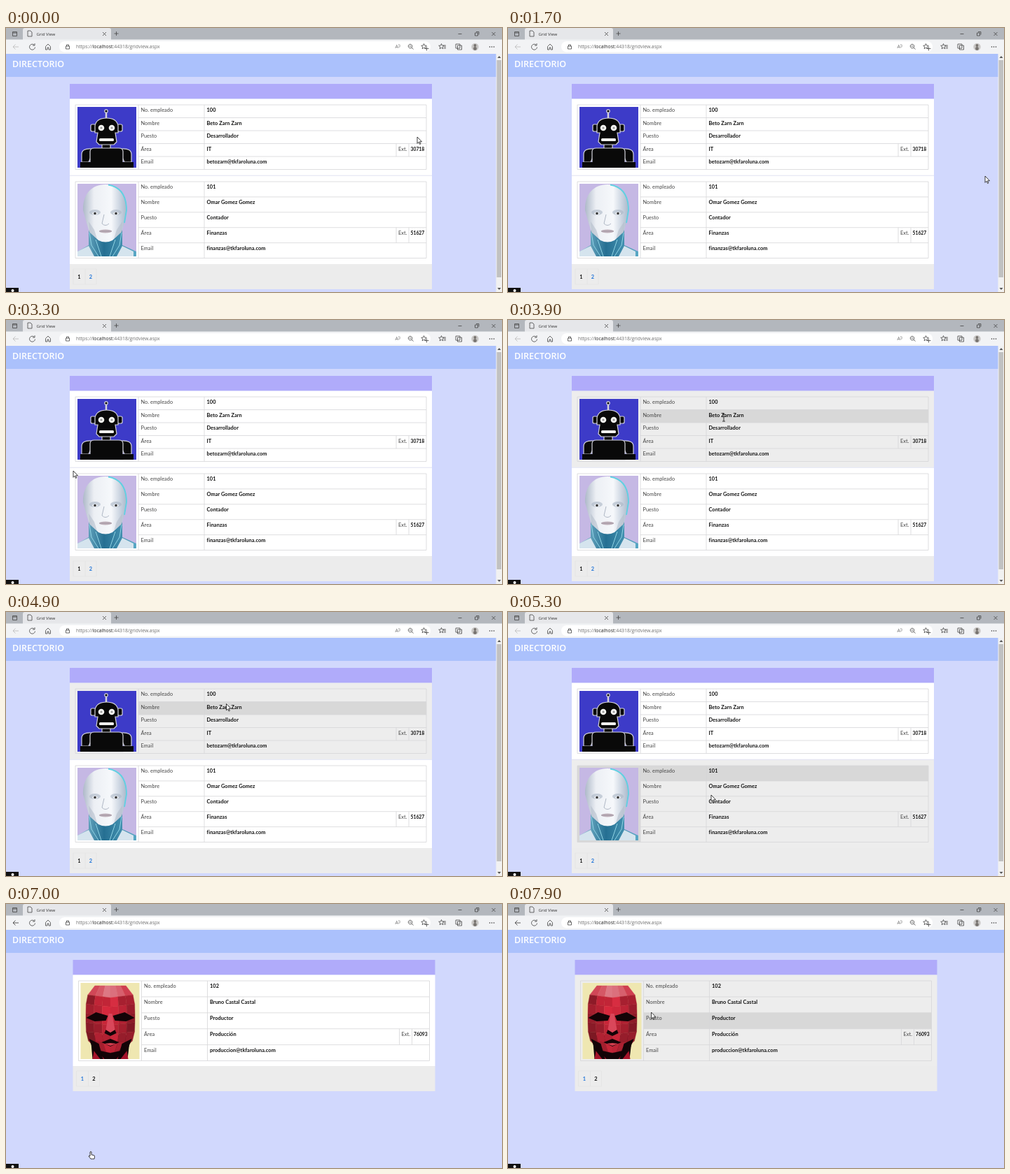
Write an HTML page that moves like this. It is 708 px wide and 378 px high and loops after 8000 ms.

```html
<!DOCTYPE html>
<html lang="es">
<head>
<meta charset="utf-8">
<title>Grid View</title>
<style>
html, body { margin: 0; width: 100%; height: 100%; overflow: hidden; }
svg { display: block; width: 100vw; height: 100vh; }
text { font: 6.9px "Open Sans", sans-serif; fill: #707070; }
.title { font-size: 12.5px; font-weight: 600; fill: #fff; }
.label { font: 7.3px Lato, sans-serif; letter-spacing: .1px; fill: #444; }
.value { font: 700 7.4px Lato, sans-serif; letter-spacing: .05px; fill: #111; }
.ext { font-size: 6.8px; letter-spacing: 0; }
.page { font: 700 7.4px Lato, sans-serif; fill: #111; text-anchor: middle; }
.link { fill: #1f74d8; }
.icon { fill: none; stroke: #444; stroke-width: .8; }
.grid { fill: none; stroke: #d6d6d8; stroke-width: .8; }
</style>
</head>
<body>
<svg id="stage" viewBox="0 0 708 378">
  <defs>
    <linearGradient id="skin">
      <stop offset="0" stop-color="#aeb9c9"/><stop offset=".25" stop-color="#eceff4"/>
      <stop offset=".65" stop-color="#f6f8fb"/><stop offset="1" stop-color="#a9b8cb"/>
    </linearGradient>
    <linearGradient id="neck">
      <stop offset="0" stop-color="#8cc4d8"/><stop offset=".45" stop-color="#256f92"/>
      <stop offset="1" stop-color="#5aa9c6"/>
    </linearGradient>
  </defs>
  <g id="chrome"></g>
  <g id="page1"></g>
  <g id="page2"></g>
  <rect y="372" width="18" height="6" fill="#111"/>
  <circle cx="9.5" cy="376" r="2" fill="#fff"/>
  <g id="cursor" fill="#fff" stroke="#111" stroke-width=".8" stroke-linejoin="round">
    <path d="M0 0V9.3L2 7.3 3.6 10.5 4.9 9.9 3.5 6.8H6.5Z"/>
    <path d="M-2-5h4M0-5V5M-2 5h4"/>
    <path d="M-1 0q1-1 2 0V4l4 1q1 1 0 5H0L-3 6q1-1 2 0z"/>
  </g>
</svg>
<script>
const $ = id => document.getElementById(id);
const rect = (x, y, w, h, fill, extra = '') =>
  `<rect x="${x}" y="${y}" width="${w}" height="${h}" fill="${fill}" ${extra}/>`;
const dot = (x, y, r, fill) => `<circle cx="${x}" cy="${y}" r="${r}" fill="${fill}"/>`;
const text = (x, y, s, cls = '') => `<text x="${x}" y="${y}" class="${cls}">${s}</text>`;
const poly = (points, fill) => `<polygon points="${points}" fill="${fill}"/>`;
const mirror = (s, axis) => s + `<g transform="matrix(-1 0 0 1 ${2 * axis} 0)">${s}</g>`;
const icon = (x, y, d, id = '') => `<path class="icon" id="${id}" transform="translate(${x} ${y})" d="${d}"/>`;

// browser window
const BOX = 'M-3-3h6v6h-6z', CROSS = 'M-2.5-2.5l5 5m0-5l-5 5', PLUS = 'M-3 0h6M0-3v6';
const STAR = 'M' + [...Array(10).keys()].map(k => {
  const r = k % 2 ? 1.8 : 4, a = k * Math.PI / 5;
  return `${r * Math.sin(a)} ${-r * Math.cos(a)}`;
}).join('L') + 'z';

$('chrome').innerHTML =
  rect(0, 0, 708, 378, '#d1d8fd') + rect(0, 0, 708, 17, '#b3b7bd') +
  rect(24, 0, 126, 20, '#e6e7ea', 'rx="3"') + rect(0, 16.5, 708, 20.5, '#f2f3f5') +
  rect(76, 19, 530, 15.5, '#fff', 'rx="7.7"') +
  icon(12.5, 8.5, BOX + 'M-3-1.5h6') + icon(34, 8, 'M-3-4h4l2 2v6h-6z') +
  icon(140.5, 8.5, CROSS) + icon(157.5, 8, PLUS) +
  icon(648, 8.5, 'M-2.5 0h5') + icon(672, 8.5, 'M-2.5-1.5h4v4h-4zM-1-3h4v4') + icon(696, 8.5, CROSS) +
  icon(14, 27, 'M4 0h-8m3.5-3.5L-4 0l3.5 3.5', 'back') +
  icon(37.5, 27, 'M3-2.5a4 4 0 1 0 1 3M3.5-5v3h-3') +
  icon(60, 27, 'M-3.5-.5L0-4l3.5 3.5V4H1V1h-2v3h-2.5z') +
  icon(88, 27, 'M-2.5-1h5v4h-5zM-1.5-1v-2h3v2') +
  icon(577, 26, 'M-2.8 0a2.8 2.8 0 1 1 0 .1M2 2l2.5 2.5M-1.5 0h3') +
  icon(596.5, 26.5, STAR) + icon(600.5, 29.5, PLUS) +
  icon(621.5, 26.5, STAR) + icon(625, 27, 'M-1-2h4M0 0h3m-3 2h3') +
  icon(645, 26, BOX) + icon(647.5, 28, BOX) +
  dot(669.5, 27, 5.2, '#c9c7c5') + dot(669.5, 25, 1.9, '#77736f') + dot(669.5, 29.5, 2.4, '#77736f') +
  [690.5, 693.5, 696.5].map(x => dot(x, 27, .8, '#333')).join('') +
  text(43.5, 10.5, '<tspan font-size="6" style="font-size:6px;fill:#333">Grid View</tspan>') +
  text(100, 29.3, 'https://<tspan style="fill:#222">localhost</tspan>:44318/gridview.aspx') +
  text(555.5, 29.3, 'A<tspan dy="-2" style="font-size:5px">))</tspan>') +
  rect(0, 37, 708, 33, '#abc1fc') + text(9, 55.5, 'DIRECTORIO', 'title');

// portraits, 84 wide
const robot = rect(0, 0, 84, 87, '#3d3bc8') + `
  <g fill="#090909" stroke="#d4d4dc" stroke-width="1.2">
    <path d="M41 8V17" stroke-width="2.5"/><circle cx="41" cy="6" r="2.2"/>
    <path d="M35 52h12v8H35z"/>` +
    mirror(rect(19, 25, 7, 10, '#090909', 'rx="2"') + '<path d="M6 79V68Q6 59 20 60V70L16 79Z"/>', 41.5) + `
    <path d="M18 87V64Q18 59 24 59H59Q65 59 65 64V87Z"/>
    <path d="M25 37V27Q27 16 41.5 16T58 27V37H54L56 50 52 54H31L27 50 29 37Z"/>
  </g>` + rect(4, 79, 76, 8, '#090909') +
  mirror(dot(34, 30, 4.3, '#f4f4f0') + dot(34, 30, 1.5, '#999'), 41.5) +
  rect(31, 45, 21, 4, '#f4f4f0', 'rx="1.5"');

const android = rect(0, 0, 84, 104, '#c5b8e4') + `
  <path d="M0 104V97L16 88V62H64V88L84 97V104Z" fill="url(#neck)"/>` +
  mirror('<path d="M0 104V97L16 89 24 104Z" fill="#d5e4ee"/>' +
    '<path d="M17 70L20 88 30 104M26 80L34 104" fill="none" stroke="#8ed3e4"/>', 40) + `
  <path d="M40 1C62 1 71 18 70 38L67 56 63 69 50 81Q40 86 30 81L17 69 13 56 8 38C7 18 18 1 40 1Z" fill="url(#skin)"/>
  <path d="M44 1.500Q70 6 70 38L67 56" fill="none" stroke="#5fd0e2" stroke-width="1.8"/>` +
  mirror('<ellipse cx="25" cy="41" rx="8" ry="4" fill="#aab5c4" opacity=".6"/>' +
    '<ellipse cx="25" cy="42.500" rx="4" ry="2" fill="#e4e7ec"/>' + dot(25, 42.5, 1.7, '#333') +
    '<path d="M16 54L24 66 28 79 17 69Z" fill="#b4becb" opacity=".6"/>', 40) + `
  <path d="M38 44L35 57Q40 62 45 57" fill="none" stroke="#b0b8c5"/>
  <ellipse cx="40" cy="68" rx="9" ry="2.5" fill="#bfb0ba"/><path d="M31 68h18" stroke="#8d8590" stroke-width=".6"/>`;

// faceted head: rows of quads, bright forehead and darker sides
function facets() {
  const ROWS = 7, SIDE = 3;
  const point = (r, c) => {
    const v = r / ROWS, half = 35 * Math.sqrt(1 - (1.8 * v - .88) ** 4);
    return `${42.5 + half * c / SIDE} ${4 + 92 * v + (1 - Math.abs(c) / SIDE) * (r ? 4 : 0)}`;
  };
  let out = '';
  for (let r = 0; r < ROWS; r++) for (let c = -SIDE; c < SIDE; c++) {
    const edge = Math.abs(c + .5), light = (r ? 49 - r : 68) - 6 * edge + (r * 7 + c * c * 5) % 4 * 2;
    const fill = `hsl(353 ${r ? 68 : 60}% ${light}%)`;
    out += `<polygon points="${[point(r, c), point(r, c + 1), point(r + 1, c + 1), point(r + 1, c)]}"
      fill="${fill}" stroke="${fill}" stroke-width=".4"/>`;
  }
  return out;
}
const mask = rect(0, 0, 84, 109, '#efe7b1') +
  poly('14,75 71,75 67,109 17,109', '#130407') + mirror(poly('17,109 20,92 34,109', '#a5142a'), 42.5) + facets() +
  mirror(poly('8,50 22,42 39,47 36,54 20,55', '#130407') + poly('12,80 26,87 32,109 28,109 18,96', '#130407') +
    poly('36,67 42.500,71 42.500,76 34,72', '#130407'), 42.5) +
  poly('40,44 45,44 49,67 42.500,71 36,67', '#d9475a') +
  poly('30,85 42.500,80 55,85 42.500,91', '#130407') + poly('34,87 42.500,86 51,87 42.500,90', '#d43e4f');

// records
const LABELS = ['No. empleado', 'Nombre', 'Puesto', 'Área', 'Email'];
const TOP = 'No. empleado';
const cards = [
  { page: 1, x: 99, top: 110, row: 18.5, from: 101.5, to: 211, pic: robot, ext: '30718',
    values: ['100', 'Beto Zarn Zarn', 'Desarrollador', 'IT', 'betozarn@tkfaroluna.com'] },
  { page: 1, x: 99, top: 220, row: 21.9, from: 211.5, to: 338, pic: android, ext: '51627',
    values: ['101', 'Omar Gomez Gomez', 'Contador', 'Finanzas', 'finanzas@tkfaroluna.com'] },
  { page: 2, x: 103.5, top: 110, row: 22.9, from: 101.5, to: 232, pic: mask, ext: '76093',
    values: ['102', 'Bruno Castal Castal', 'Productor', 'Producción', 'produccion@tkfaroluna.com'] }
];

function drawCard(c, i) {
  const { x, top, row } = c, bottom = top + 5 * row, area = top + 3 * row;
  let lines = `M${x} ${top}h501V${bottom}h-501zM${x + 90} ${top}V${bottom}M${x + 184} ${top}V${bottom}`;
  for (let k = 1; k < 5; k++) lines += `M${x + 90} ${top + k * row}h411`;
  lines += `M${x + 458} ${area}v${row}m18 0v${-row}`;
  const rows = c.values.map((v, k) => {
    const y = top + k * row + 10.4;
    return text(x + 93.5, y, LABELS[k], 'label') + text(x + 187.5, y, v, 'value');
  });
  return rect(x - 8, c.from, 517, c.to - c.from, '#fff', `id="bg${i}"`) +
    `<path id="dark${i}" fill="#d8d8d8"/><path class="grid" d="${lines}"/>` +
    `<g transform="translate(${x + 3} ${top + 3})">${c.pic}</g>` + rows.join('') +
    text(x + 461, area + 10.4, 'Ext.', 'label') + text(x + 478.5, area + 10.4, c.ext, 'value ext');
}

function drawPage(n, x, y) {
  const cls = k => k === n ? 'page' : 'page link';
  return rect(x, 80, 517, 21.5, '#b0abfa') +
    cards.map((c, i) => c.page === n ? drawCard(c, i) : '').join('') + rect(x, y, 517, 36, '#ececec') +
    `<path class="grid" style="stroke:#e4e4e4" d="M${x + 5} ${y + 7}h33v22h-33zm17 0v22"/>` +
    text(x + 13.5, y + 20.8, '1', cls(1)) + text(x + 30, y + 20.8, '2', cls(2));
}

$('page1').innerHTML = drawPage(1, 91, 338) + rect(91, 210.7, 517, .8, '#e9e9f0') +
  rect(699.5, 37, 8.5, 341, '#f1f1f1') + rect(700.5, 46, 6.5, 311, '#c1c1c1') +
  poly('701.5,43 704,40 706.5,43', '#555') + poly('701.5,372 704,375 706.5,372', '#555');
$('page2').innerHTML = drawPage(2, 95.5, 232);

// pointer moves: begin, end, x, y
const moves = [
  [0, 500, 674, 152], [1600, 1700, 681, 212], [1800, 2400, 257.5, 275], [2500, 3000, 70, 235],
  [3000, 3300, 96, 216], [3300, 3900, 308, 140], [3900, 4300, 330, 270], [4400, 4900, 314.5, 131.5],
  [4900, 5300, 290, 262], [5300, 5600, 196, 318], [5700, 5900, 185, 361], [5900, 6400, 121, 355],
  [7200, 7900, 204.5, 155]
];
function pointer(t) {
  let x = 587, y = 156;
  for (const [begin, end, toX, toY] of moves) {
    const f = Math.min(1, Math.max(0, (t - begin) / (end - begin))), ease = f * f * (3 - 2 * f);
    x += (toX - x) * ease;
    y += (toY - y) * ease;
  }
  return [x, y];
}

function hover(c, i, x, y, active) {
  const over = active && x > c.x - 8 && x < c.x + 509 && y > c.from && y < c.to;
  $('bg' + i).setAttribute('fill', over ? '#ededed' : '#fff');
  let d = '';
  if (over && x > c.x && x < c.x + 501 && y > c.top && y < c.top + 5 * c.row) {
    // the picture cell belongs to the first row
    const k = x < c.x + 90 ? 0 : Math.floor((y - c.top) / c.row);
    d = `M${c.x + 90} ${c.top + k * c.row}h411v${c.row}h-411z`;
    if (!k) d += `M${c.x} ${c.top}h90v${5 * c.row}h-90z`;
  }
  $('dark' + i).setAttribute('d', d);
}

const LOOP = 8000, STEP = 100, SWITCH = 6900;
const [ARROW, BEAM, HAND] = [0, 1, 2];
const start = performance.now();

function draw() {
  const t = Math.floor((performance.now() - start) % LOOP / STEP) * STEP;
  const page = t < SWITCH ? 1 : 2;
  $('page1').style.display = page === 1 ? '' : 'none';
  $('page2').style.display = page === 2 ? '' : 'none';
  $('back').style.stroke = page === 1 ? '#b8b8b8' : '#333';

  // highlighting trails the pointer by one step
  const [hx, hy] = pointer(t - STEP);
  cards.forEach((c, i) => hover(c, i, hx, hy, c.page === page && t > 600));

  const [x, y] = pointer(t);
  const shape = t >= 3800 && t < 4000 ? BEAM : t >= 6300 && t < 7300 ? HAND : ARROW;
  [...$('cursor').children].forEach((s, k) => s.style.display = k === shape ? '' : 'none');
  $('cursor').setAttribute('transform', `translate(${x} ${y})`);
  requestAnimationFrame(draw);
}
draw();
</script>
</body>
</html>
```
